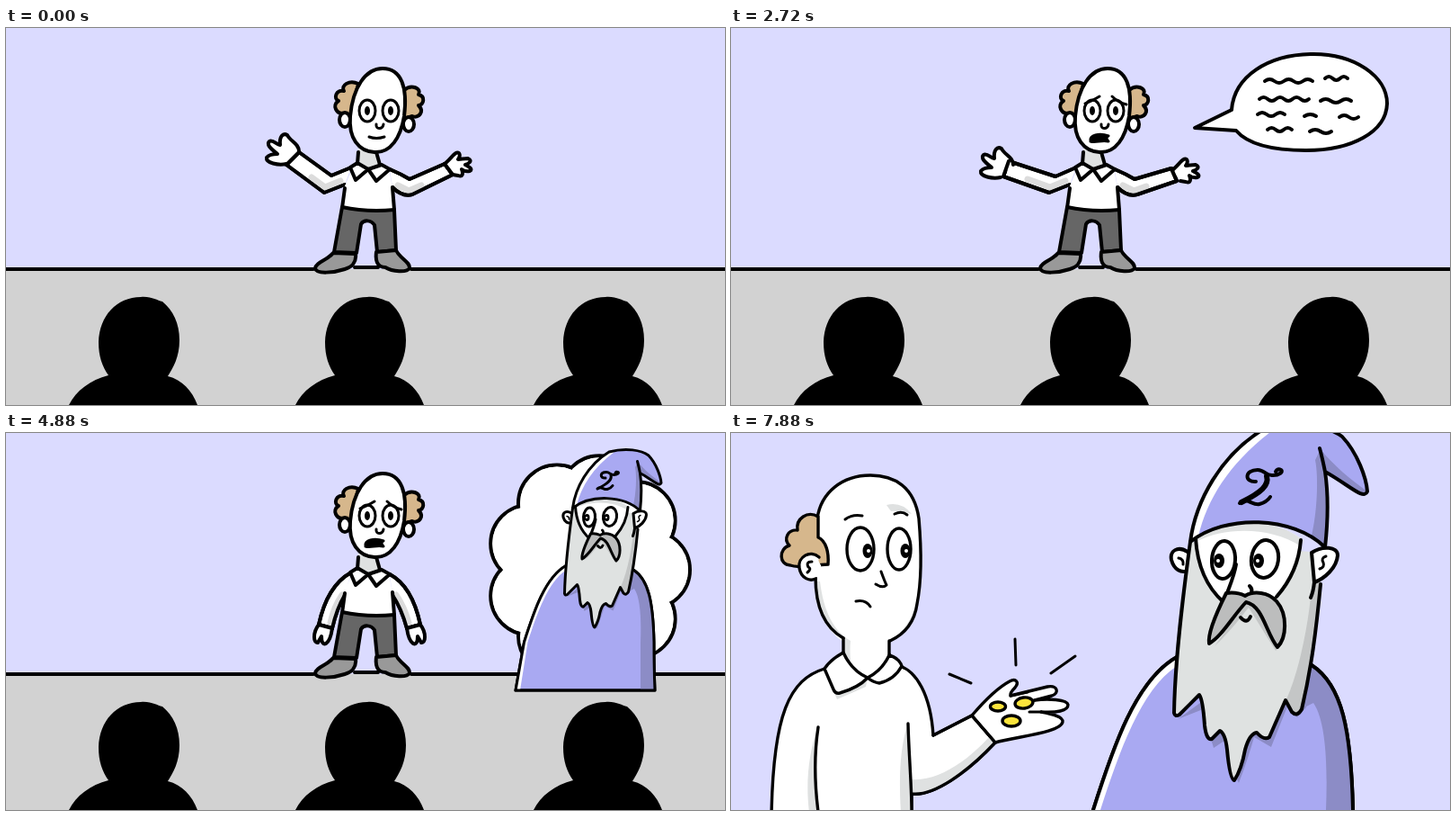
An HTML page that plays this animation: 800x419 px, repeating every 8000 ms.

```html
<!DOCTYPE html>
<html lang="en">
<head>
<meta charset="utf-8">
<title>Stage and wizard</title>
<style>
html, body { margin: 0; width: 100%; height: 100%; overflow: hidden; background: #dbdbff; }
svg { display: block; width: 100%; height: 100%; }
.ink { fill: none; stroke: #000; stroke-width: 4; stroke-linecap: round; stroke-linejoin: round; }
.w { fill: #fff; }
.k { fill: #000; }
.hair { fill: #d6b78c; }
.gold { fill: #fbe43c; }
.flat { stroke: none; }
.sh { fill: #dfe1e1; stroke: none; }
.shade { stroke: #dcdcdc; stroke-width: 7; }
.robe { fill: #a9a9f2; }
.dark { fill: #8c8cc6; stroke: none; }
.thin { stroke-width: 3; }
#man { stroke-width: 3.4; }
.mini { stroke-width: 6; }
</style>
</head>
<body>
<svg viewBox="0 0 800 419" preserveAspectRatio="none">
  <defs>
    <path id="person" d="M150 299C162 298 168 303 174 304C186 314 193 328 193 347C193 366 186 377 180 387C196 391 207 403 213 419H70C78 403 94 391 114 386C107 376 103 365 103 349C104 320 123 299 150 299Z"/>
    <path id="drop" class="ink w thin" d="M-12-5C-5-7 4-6 11 0C15 6 9 8 3 6C-5 5-9 0-12-5Z"/>
    <g id="wizard">
      <path class="robe" d="M496 249C450 275 425 350 403 419L384 526H694C692 480 692 450 692 419C690 330 680 280 646 258Z"/>
      <path class="w flat" d="M496 249C450 275 425 350 403 419L384 526H394L411 419C432 355 456 285 496 259Z"/>
      <path class="dark" d="M646 258C680 280 690 330 692 419V526H662V419C664 370 662 320 648 300L638 305Z"/>
      <path d="M496 249C450 275 425 350 403 419L384 526H694C692 480 692 450 692 419C690 330 680 280 646 258"/>
      <path class="dark" d="M497 318L522 300L537 350L552 340Q557 375 565 389Q576 360 582 338L601 349L619 304L630 316L640 305V262Z"/>
      <path class="w" d="M508 132C497 125 488 131 490 141C493 152 501 156 508 153"/>
      <path d="M498 139Q504 140 503 146" stroke-width="3"/>
      <path fill="#dfe2e1" class="flat" d="M511 121C503 180 494 250 493 311Q494 316 499 313L521 291Q525 296 527 325Q529 342 535 340L544 331Q550 334 552 352Q555 385 560 386Q568 374 572 352Q577 334 585 333Q593 342 599 338L617 297L624 310Q630 316 635 307C647 250 656 190 657 133Z"/>
      <path fill="#c4c6c6" class="flat" d="M647 160C644 205 634 260 618 296L624 310Q630 316 635 307C647 250 654 190 656 160Z"/>
      <path d="M511 121C503 180 494 250 493 311Q494 316 499 313L521 291Q525 296 527 325Q529 342 535 340L544 331Q550 334 552 352Q555 385 560 386Q568 374 572 352Q577 334 585 333Q593 342 599 338L617 297L624 310Q630 316 635 307C646 260 651 220 656 168"/>
      <path class="w" d="M646 133C658 125 675 126 675 136C674 150 660 162 649 166Z"/>
      <path d="M649 166Q648 176 645 183"/>
      <path d="M662 137Q656 139 659 144Q661 149 655 151" stroke-width="3"/>
      <path class="w flat" d="M517 115C519 150 530 172 548 188L608 182C622 165 632 145 634 117C600 93 550 93 517 115Z"/>
      <path class="sh" d="M517 121V115C550 93 600 93 634 117V126C600 104 550 104 517 121Z"/>
      <path d="M517 117C519 150 530 172 548 188M634 119C632 145 622 165 607 182"/>
      <ellipse class="w" cx="548" cy="141" rx="13" ry="21" transform="rotate(4 548 141)"/>
      <ellipse class="w" cx="594" cy="140" rx="15" ry="21" transform="rotate(8 594 140)"/>
      <g class="gaze">
        <ellipse class="k flat" cx="543" cy="142" rx="6" ry="8"/>
        <ellipse class="k flat" cx="587" cy="142" rx="6" ry="8"/>
        <circle class="w flat" cx="542" cy="142" r="2"/>
        <circle class="w flat" cx="586" cy="142" r="2"/>
      </g>
      <path class="w" d="M562 146C560 158 556 167 552 178L570 183C581 181 581 174 577 170"/>
      <path fill="#c4c6c6" class="flat" d="M538 237C556 220 566 206 576 194L606 242Q618 232 618 220L575 186Z"/>
      <path fill="#bcbdbd" d="M551 178C543 194 530 222 532 234C546 226 558 204 573 188C592 192 595 222 608 238C618 228 620 202 607 187C598 177 582 175 572 181C566 178 558 177 551 178Z"/>
      <path d="M567 205Q574 213 578 204"/>
      <path class="robe flat" d="M511 121C517 75 545 25 592-4C630-14 664-8 680 4C697 22 707 50 708 65C704 75 688 58 661 43C665 70 664 100 661 127C625 92 550 90 511 121Z"/>
      <path class="w flat" d="M511 121C517 75 545 25 592-4H604C556 32 530 72 520 115Z"/>
      <path class="dark" d="M656 18Q662 40 661 43C665 70 664 100 661 127L646 114C652 90 654 50 650 30ZM656 18L663 43C688 58 704 75 708 65C690 52 670 36 656 18Z"/>
      <path d="M511 121C517 75 545 25 592-4C630-14 664-8 680 4C697 22 707 50 708 65C704 75 688 58 661 43C665 70 664 100 661 127C625 92 550 90 511 121ZM661 43Q658 28 655 17"/>
      <path d="M584 54C571 55 571 41 586 41C594 41 595 48 603 47C610 47 615 43 612 41Q608 39 606 43M566 78C573 70 580 81 588 79Q596 77 600 71"/>
      <path d="M596 48C599 58 590 66 568 77" stroke-width="6"/>
    </g>
  </defs>

  <g id="stage">
    <rect width="800" height="419" fill="#dbdbff"/>
    <rect y="268" width="800" height="151" fill="#d2d2d2"/>
    <path class="ink" d="M-5 268H342M388 266H414M451 268H805"/>
    <g id="magic"></g>
    <g class="ink">
      <path class="sh" d="M392 134L391 152L403 158L417 153L413 135Z"/>
      <path d="M392 138L391 151M412 138L416 152"/>
      <g id="arms"></g>
      <path class="w flat" d="M386 154L376 178L374 201L431 203L430 178L426 156L403 158Z"/>
      <path d="M377 178L374 200M430 177L432 202"/>
      <path class="w" d="M391 150L383 155L389 169L403 157ZM403 157L412 170L427 157L418 152Z"/>
      <path fill="#666" d="M374 199Q402 205 432 202L434 247L413 249L410 219C406 213 398 213 395 218L390 250L365 249Z"/>
      <path fill="#999" d="M364 250L389 251C390 260 385 266 377 268C365 272 345 274 344 267C345 260 358 258 364 250ZM412 249L434 247C438 256 450 260 449 267C446 272 430 271 422 266C412 266 411 257 412 249Z"/>
      <path class="hair" d="M392 62C382 57 372 64 376 70C367 68 364 79 370 81C362 86 368 96 376 95L384 97ZM443 69C451 62 463 67 459 74C467 76 465 85 459 86C466 93 459 101 452 98L443 101Z"/>
      <ellipse class="w" cx="377" cy="102" rx="6" ry="8"/>
      <ellipse class="w" cx="448" cy="107" rx="6" ry="8"/>
      <path class="w" d="M419 45C400 45 386 66 383 98C381 122 392 137 410 138C428 139 439 122 443 98C447 66 440 45 419 45Z"/>
      <ellipse class="thin" cx="402" cy="92" rx="9" ry="12"/>
      <ellipse class="thin" cx="428" cy="92" rx="9" ry="12"/>
      <ellipse class="k flat" cx="402" cy="92" rx="3" ry="5"/>
      <ellipse class="k flat" cx="428" cy="92" rx="3" ry="5"/>
      <path class="thin" d="M412 107C411 113 419 113 420 107"/>
      <path id="smile" class="thin" d="M404 121Q412 124 421 121"/>
      <path id="gape" class="k thin" d="M400 126C398 119 410 116 420 120Q416 122 420 126C412 124 406 128 400 126Z"/>
      <path id="brows" class="thin" d="M394 84Q400 82 410 76M424 76Q431 83 440 85"/>
    </g>
    <use id="sweat" href="#drop"/>
    <g id="bubble" class="ink">
      <path class="w" d="M516 111L557 91C560 53 598 30 645 29C694 28 730 54 730 84C729 116 690 136 640 136C600 136 574 128 562 114Z"/>
      <path id="words"/>
    </g>
    <use href="#person"/><use href="#person" x="252"/><use href="#person" x="517"/>
  </g>

  <g id="close">
    <rect width="800" height="419" fill="#dbdbff"/>
    <use href="#wizard" class="ink"/>
    <g id="man" class="ink">
      <path class="w" d="M104 262C65 274 47 312 45 425H201V401C225 404 262 378 294 344L268 314L225 336C222 290 206 265 188 259L176 246L125 244Z"/>
      <path class="sh" d="M97 327C91 360 93 390 97 421H87C83 390 86 355 97 327ZM197 323C198 360 201 390 201 421H189C187 390 187 350 197 323ZM201 401C225 404 262 378 294 344L288 337C262 366 228 388 200 385ZM106 268L118 296L150 282L152 272L118 290Z"/>
      <path d="M97 327C92 360 93 390 97 421M197 323C198 360 201 390 201 421M201 401C225 404 262 378 294 344M268 314L225 336"/>
      <path class="w flat" d="M125 225V250Q138 266 151 272L177 248V225Z"/>
      <path class="w flat" d="M96 95C100 66 124 47 155 47C182 47 204 60 209 95C212 130 212 165 207 190C204 212 192 224 177 232H125C100 215 94 190 94 155Z"/>
      <path class="sh" d="M94 165C94 190 100 215 125 229V245L133 254Q132 240 133 231C114 220 103 198 99 165ZM173 80Q190 76 201 90Q190 86 178 87ZM208 185Q201 212 180 230Q203 218 208 185Z"/>
      <path d="M125 228V246M176 231V247"/>
      <path class="w" d="M125 244C116 249 109 254 104 262L114 285Q116 290 121 289Q142 283 152 272Q134 264 125 244ZM152 272Q158 277 165 278Q182 274 190 259Q187 250 176 247Q168 264 152 272Z"/>
      <path d="M96 95C100 66 124 47 155 47C182 47 204 60 209 95C212 130 212 165 207 190C204 212 192 224 177 231M94 160C94 190 102 215 125 228"/>
      <path class="hair" d="M97 93C85 86 72 95 74 108C63 107 58 118 65 125C53 128 53 147 66 147Q72 149 78 148L108 146C109 133 106 120 97 116Z"/>
      <path class="w" d="M98 138C88 129 74 138 76 150C78 162 88 165 94 162"/>
      <path class="w flat" d="M95 138L100 147V160H93Z"/>
      <path class="thin" d="M90 143Q83 143 86 149Q90 151 85 155"/>
      <ellipse class="w" cx="144" cy="129" rx="15" ry="24"/>
      <ellipse class="w" cx="187" cy="129" rx="13" ry="23"/>
      <ellipse class="k flat" cx="152" cy="131" rx="5.5" ry="8"/>
      <ellipse class="k flat" cx="194" cy="131" rx="5.5" ry="8"/>
      <circle class="w flat" cx="153" cy="131" r="2"/>
      <circle class="w flat" cx="195" cy="131" r="2"/>
      <path class="thin" d="M127 96Q135 90 146 92M182 90Q190 86 196 91M167 154Q171 165 173 169Q169 173 161 168M139 187Q150 185 155 193"/>
      <path class="w" d="M268 314C280 300 295 284 310 276C317 272 321 277 316 283Q310 289 311 292L352 282C363 280 366 289 357 292L338 297C352 295 374 296 375 302C375 309 362 311 345 310C356 312 370 315 369 321C367 333 320 337 294 344Z"/>
      <path class="thin" d="M311 292L330 288M338 297L328 299M345 310H332"/>
      <path d="M268 314L294 344"/>
      <ellipse class="gold" cx="297" cy="304" rx="8.5" ry="5"/>
      <ellipse class="gold" cx="326" cy="300" rx="10" ry="6" transform="rotate(-8 326 300)"/>
      <ellipse class="gold" cx="312" cy="320" rx="10" ry="6"/>
    </g>
    <g id="rays" class="ink thin">
      <path d="M243 268L267 278"/><path d="M316 229L317 258"/><path d="M356 267L383 248"/>
    </g>
  </g>
</svg>
<script>
const $ = id => document.getElementById(id);
const show = (el, on) => el.style.display = on ? '' : 'none';
const only = (group, n) => [...group.children].forEach((el, i) => show(el, i === n));
const LOOP = 8000;

const HAND = {
  left: 'M312 151C303 153 289 150 290 144Q293 140 302 140C296 135 289 130 293 126C297 123 302 131 305 130C304 121 308 116 313 119C316 126 326 128 326 137',
  right: 'M488 151C495 146 500 136 504 139Q506 142 503 146L514 145C520 148 514 151 511 152C515 154 520 157 516 159Q511 160 507 157C509 162 508 166 503 164L497 163',
  leftLow: 'M306 188C297 187 288 189 289 194Q292 197 298 196C292 201 287 206 290 209Q295 210 299 206C297 211 296 217 301 216C306 214 306 207 310 206',
  rightLow: 'M491 192C498 190 505 190 506 195Q504 199 501 199C506 201 511 206 509 210Q505 211 500 207C503 213 502 217 497 215C493 212 493 208 488 208',
  leftHang: 'M348 213C341 222 342 234 347 233L351 226Q351 236 356 234Q361 231 363 217',
  rightHang: 'M461 213C468 222 467 234 462 233L458 226Q458 236 453 234Q448 231 446 217'
};
const arm = (line, shade, cuff, hand, move = '0 0') =>
  `<path class="w" d="${line}"/><path class="shade" d="${shade}"/><path d="${line}"/>` +
  `<path class="w" d="${hand}" transform="translate(${move})"/><path d="${cuff}"/>`;
const POSES = [
  arm('M384 155L362 164L326 138L312 152L354 183L377 174', 'M340 166L355 177L372 170', 'M326 138L312 152', HAND.left) +
  arm('M427 157Q439 162 449 168L488 151L497 163L452 185Q441 188 430 177', 'M462 175L448 181L436 175', 'M488 151L497 163', HAND.right),
  arm('M384 155L361 165L309 148L303 165L354 183L377 174', 'M330 168L355 177L372 170', 'M309 148L303 165', HAND.left, '-12 15') +
  arm('M427 157Q439 162 449 168L490 156L496 170L452 185Q441 188 430 177', 'M462 176L448 181L436 175', 'M490 156L496 170', HAND.right, '3 7'),
  arm('M384 155L306 188L310 206L377 179', 'M335 191L372 175', 'M306 188L310 206', HAND.leftLow) +
  arm('M427 156Q450 172 491 192L488 208Q450 194 430 177', 'M460 190L436 176', 'M491 192L488 208', HAND.rightLow),
  arm('M384 155C366 165 354 185 348 213L363 217Q368 195 377 180', 'M361 211Q365 193 374 180', 'M348 213L363 217', HAND.leftHang) +
  arm('M427 157C444 166 455 185 461 213L446 217Q440 195 430 180', 'M448 211Q443 193 434 180', 'M461 213L446 217', HAND.rightHang)
];
const groups = list => list.map(s => `<g>${s}</g>`).join('');
$('arms').innerHTML = groups(POSES);

// Wavy lines in the speech bubble: x, y, length
const ROWS = [[594, 59, 53], [661, 56, 25], [588, 79, 55], [656, 81, 34], [586, 96, 30],
  [638, 98, 13], [677, 99, 21], [597, 113, 27], [644, 115, 24]];
function squiggles(dip) {
  return ROWS.map(([x, y, len]) => {
    const n = Math.round(len / 10), s = len / n;
    return `M${x} ${y}q${s / 2} ${dip} ${s} 0` + `t${s} 0`.repeat(n - 1);
  }).join('');
}
const WORDS = [squiggles(4), squiggles(-4)];

// Smoke puff: "spread" pushes the lobes out, "r" is their size
function puff(spread, r, core) {
  const lobes = Array.from({ length: 9 }, (_, i) => {
    const a = i * Math.PI * 2 / 9;
    return `cx="${648 + Math.cos(a) * 70 * spread}" cy="${152 + Math.sin(a) * 85 * spread}"`;
  });
  const ring = (cls, size) => lobes.map(c => `<circle class="${cls}" ${c} r="${size}"/>`).join('');
  const mid = core ? `<ellipse class="w flat" cx="648" cy="152" rx="${70 * spread}" ry="${85 * spread}"/>` : '';
  return ring('ink w', r) + mid + ring('w flat', r - 2);
}
const MINI = '<use href="#wizard" class="ink mini" transform="translate(375 23) scale(.5)"/>';
$('magic').innerHTML = groups([
  puff(.45, 24, true), puff(1, 43, true), puff(1, 43, true) + MINI, puff(1.25, 18, false) + MINI, MINI
]);

// Sweat drops fly off to the right, later to the left: x, y, angle, flip
function sweatAt(step) {
  if (step >= 9 && step <= 13) {
    const k = step - 11;
    return [513 + k * 18, 52 + k * 8 + k * k * 4, k * 14, 1];
  }
  if (step >= 18 && step <= 21) {
    const k = step - 18;
    return [345 - k * 37, 56 + k * k * 5, -k * 8, -1];
  }
}

function drawStage(t) {
  const step = Math.min(23, Math.floor(t / 160)), odd = step % 2;
  only($('arms'), t >= 4240 ? 3 : t >= 4080 ? 2 : odd);
  show($('brows'), step >= 8);
  show($('gape'), odd);
  show($('smile'), !odd);
  show($('bubble'), step >= 1 && step < 23);
  $('words').setAttribute('d', WORDS[odd]);
  const drop = sweatAt(step);
  show($('sweat'), drop);
  if (drop) {
    const [x, y, a, flip] = drop;
    $('sweat').setAttribute('transform', `translate(${x} ${y}) rotate(${a}) scale(${flip} 1)`);
  }
  only($('magic'), t < 4640 ? -1 : Math.min(4, Math.floor((t - 4640) / 110)));
}

const gaze = document.querySelector('.gaze');
const RAY_DIRS = [[-1, -.4], [0, -1], [.9, -.6]];

function drawClose(t) {
  const step = Math.floor((t - 6080) / 120);
  show($('man'), step >= 1);
  const left = Math.max(0, 1 - step / 9);
  $('man').setAttribute('transform', `translate(${-315 * left ** 4} 0)`);
  gaze.setAttribute('transform', `translate(${step < 1 ? -2 : 0} 0)`);
  show($('rays'), step >= 10);
  const out = step % 2 ? 0 : 4;
  RAY_DIRS.forEach(([x, y], i) =>
    $('rays').children[i].setAttribute('transform', `translate(${x * out} ${y * out})`));
}

const start = performance.now();
function frame() {
  const t = (performance.now() - start) % LOOP;
  const close = t >= 5880;
  show($('stage'), !close);
  show($('close'), close);
  (close ? drawClose : drawStage)(t);
  requestAnimationFrame(frame);
}
frame();
</script>
</body>
</html>
```
